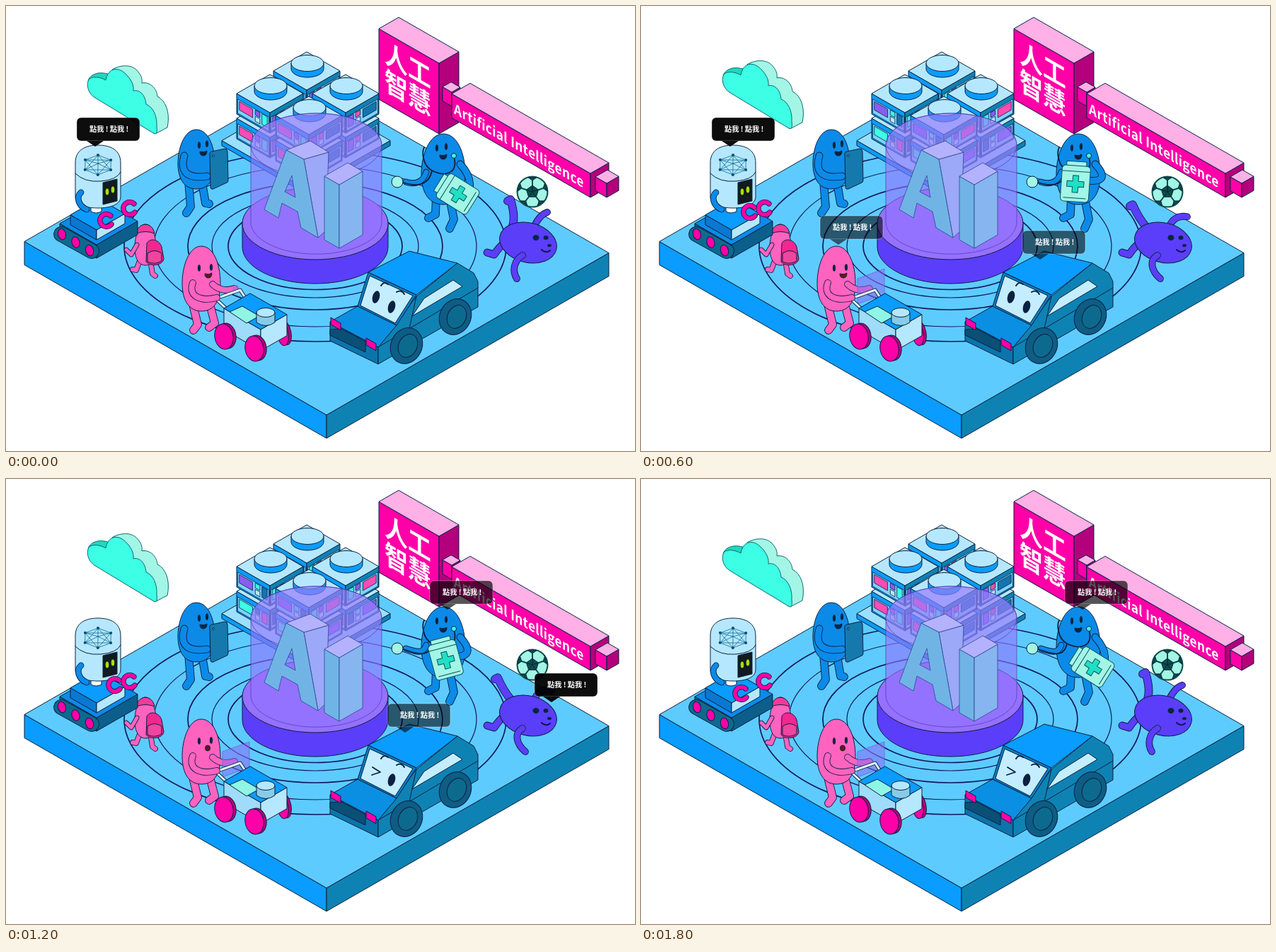
An HTML page that plays this animation: 889 by 630 pixels, repeating every 2100 ms.

```html
<!DOCTYPE html>
<html lang="zh-Hant">
<head>
<meta charset="utf-8">
<title>人工智慧</title>
<style>
html, body { margin: 0; width: 100%; height: 100%; overflow: hidden; background: #fff; }
svg { display: block; width: 100%; height: 100%; stroke: #0b2140; stroke-width: 1; stroke-linejoin: round; }
text { stroke: none; fill: #fff; font-family: "Noto Sans CJK TC", "Noto Sans CJK", "Noto Sans", sans-serif; font-weight: 700; }
</style>
</head>
<body>
<svg id="stage" viewBox="0 0 889 630"></svg>
<script>
const SKY = '#5ecbff', BLUE = '#0a9cff', DEEP = '#0f82b4', PALE = '#b5e8ff', TEAL = '#0d6a8f', BODY = '#0c8ae8',
  HOT = '#ff00a8', ROSE = '#ffb0e6', WINE = '#b4007c', PINK = '#ff63c0', MINT = '#3cffe6',
  FOAM = '#a3f5e6', VIOLET = '#5b3efa', INK = '#0b2140', SLOPE = .575;

// Drawing helpers: each returns SVG markup
const each = (n, draw) => Array.from({ length: n }, (_, i) => draw(i)).join('');
const poly = (pts, fill, more = '') => `<polygon points="${pts}" fill="${fill}" ${more}/>`;
const path = (d, fill = 'none', more = '') => `<path d="${d}" fill="${fill}" ${more}/>`;
const oval = (x, y, rx, ry, fill, turn = 0, more = '') =>
  `<ellipse cx="${x}" cy="${y}" rx="${rx}" ry="${ry}" fill="${fill}" transform="rotate(${turn} ${x} ${y})" ${more}/>`;
const dot = (x, y, rx, ry, fill = '#08263f', turn = 0) => oval(x, y, rx, ry, fill, turn, 'stroke="none"');
const line = (d, color = INK, w = 1.5) =>
  path(d, 'none', `stroke="${color}" stroke-width="${w}" stroke-linecap="round"`);
const limb = (d, color, w = 10) => line(d, INK, w + 1.8) + line(d, color, w);
const iso = (x, y, size, str, more) =>
  `<text transform="matrix(.866 .5 0 1 ${x} ${y})" font-size="${size}" ${more}>${str}</text>`;

// Isometric box: (x, y) is the near corner of its top, w runs to the left, d to the right
function box(x, y, w, d, h, left, top, right) {
  const a = [x - w, y - w * SLOPE], b = [x + d, y - d * SLOPE], back = [x - w + d, y - (w + d) * SLOPE];
  const wall = ([cx, cy], fill) => poly([x, y, cx, cy, cx, cy + h, x, y + h], fill);
  return wall(a, left) + wall(b, right) + poly([[x, y], a, back, b], top);
}

// Upright body, narrow at the top
const egg = (x, y, r, h, fill) => path(`M${x},${y}C${x + r * .65},${y} ${x + r},${y + h * .28} ${x + r},${y + h * .57}` +
  `S${x + r * .65},${y + h} ${x},${y + h} ${x - r},${y + h * .83} ${x - r},${y + h * .57} ${x - r * .65},${y} ${x},${y}Z`, fill);
const smile = (x, y, fill = '#08263f') => path(`M${x - 5},${y - 2}q6,2 10,-1q0,7 -5,7t-5,-6Z`, fill);
const eyes = (x, y, gap, tilt = 0) => dot(x, y, 2.1, 4.8) + dot(x + gap, y + tilt, 2.1, 4.8);

function floor() {
  return box(453, 579, 427, 399, 33, BLUE, SKY, DEEP) + [270, 228, 180, 146, 123].map((r, i) =>
    oval(437, 340, r, r / 2, 'none', 0, `stroke="#101a5c" stroke-width="${i % 2 ? 1.2 : 1.7}"`)).join('');
}

// Server block: both faces carry a panel with one wide and two narrow windows
function block(x, y, tone) {
  const lights = ['#ff4bb4', '#8a5cf0', MINT, '#1474b0'];
  const face = side => {
    const pane = (u, wide, v, high, fill) => {
      const at = s => [x + side * 47 * (1 - s), y + 27 * s + v];
      const [[ax, ay], [bx, by]] = [at(u), at(u + wide)];
      return poly([ax, ay, bx, by, bx, by + high, ax, ay + high], fill, 'stroke-width=".8"');
    };
    const light = i => lights[(tone + i + (side > 0 ? 3 : 0)) % 4];
    return pane(.03, .94, 7, 20, '#7fd2ff') + pane(.08, .4, 9, 12, light(0)) +
      pane(.56, .14, 8, 7, light(1)) + pane(.56, .14, 17, 7, PALE) + pane(.76, .16, 8, 15, light(2));
  };
  return box(x, y + 27, 47, 47, 29, BLUE, PALE, DEEP) + face(-1) + face(1);
}

const stud = (x, y) => path(`M${x - 23},${y - 3}v8a23,12 0 0 0 46,0v-8`, BLUE) + oval(x, y - 3, 23, 11.5, PALE);

function servers(k) {
  const layer = (lift, tone) => [[425, 92], [373, 124], [480, 124], [428, 155]].map(([x, y]) =>
    block(x, y + lift, tone) + (lift ? '' : stud(x + 1, y - 8))).join('');
  return box(424, 259, 119, 119, 7, BLUE, '#9be0ff', DEEP) + layer(35, Math.min(k, 2)) + layer(0, Math.min(k, 1));
}

function hologram() {
  const rim = 'stroke="#4a3bb0" stroke-width=".7"', front = '#70b4e6', side = '#9ca8f8', top = '#b4b2fc';
  return path('M334,308v33a103,52 0 0 0 206,0v-33', VIOLET) + oval(437, 308, 103, 51, '#9670ff') +
    path('M346,197a92,45 0 0 1 185,0V306a92,45 0 0 1 -185,0Z', '#9274ff', `fill-opacity=".62" ${rim}`) +
    oval(438.5, 197, 92.5, 45, '#a894ff', 0, `fill-opacity=".18" ${rim}`) + '<g stroke="#2b4a90" stroke-width=".8">' +
    poly('421,217 456,207 452,318 441,328', side) + poly('396,204 430,191 456,207 421,217', top) +
    path('M365,288L396,204 421,217 441,328 417,314 412,291 390,279 385,300ZM394,263L409,271 404,240Z', front, 'fill-rule="evenodd"') +
    box(471, 253, 21, 33, 90, front, top, '#86b5ef') + '</g>';
}

function sign() {
  const pink = (...size) => box(...size, HOT, ROSE, WINE);
  return pink(612, 81, 85, 28, 100) + iso(535, 79, 38, '人工', 'style="font-weight:900"') +
    iso(535, 118, 38, '智慧', 'style="font-weight:900"') + pink(630, 122, 13, 12, 20) + pink(826, 237, 196, 26, 34) +
    iso(633, 152, 20, 'Artificial Intelligence', 'letter-spacing=".35"') + pink(849, 251, 16, 17, 20);
}

function cloud(k) {
  return `<g transform="translate(0 ${-3.6 * k})" stroke="#0b6a70">` +
    path('M150,90C160,84 175,82 184,90 191,97 193,103 192,109 203,107 213,116 214,128 226,134 231,150 229,166L228,172 211,181Z', FOAM) +
    path('M116,106C118,98 130,91 146,97L141,106Z', '#1fd8bd') +
    path('M126,130C116,124 113,112 117,104 122,99 132,100 141,105 144,88 158,85 169,96 177,104 181,112 180,120 190,118 197,127 198,139 208,143 214,156 213,171 214,178 213,181 210,181Z', MINT) + '</g>';
}

function robot(k) {
  const claw = (x, y) => limb(`M${x + 6},${y - 6}A9,9 0 1 0 ${x + 7},${y + 6}`, HOT, 5.5);
  const reach = 6 * (2 - Math.abs(2 - k)), lift = k % 2 * k;
  const node = i => [130 + 21 * Math.sin(i * 1.05), 225 - 14 * Math.cos(i * 1.05)];
  const web = each(6, i => line(`M${node(i)}L${node(i + 1)}M${node(i)}L${node(i + 2)}M130,223L${node(i)}`, TEAL, .8));
  return box(128, 338, 52, 58, 19, TEAL, BODY, '#0b5f8a') + limb('M78,323L121,347', TEAL, 20) +
    each(3, i => oval(79 + 19.5 * i, 323 + 11.5 * i, 5.5, 8, HOT, -15)) +
    box(128, 317, 37, 40, 14, '#0a78d0', BLUE, PALE) + path('M120,283h15v8q-8,4 -15,0Z', '#fff') +
    path('M98,222C98,204 112,197 130,197S162,204 162,222V270C162,281 148,286 130,286S98,281 98,270Z', PALE) +
    line('M98,237Q111,250 134,248T162,235', INK, 1) + web + each(6, i => dot(...node(i), 2, 2, '#07506f')) +
    poly('137,250 157,245 157,276 137,281', '#111b20') +
    dot(143, 263, 2.3, 4.5, '#a8e000') + dot(151, 260, 2.3, 4.5, '#a8e000') +
    limb('M106,264C99,270 102,283 114,288', BODY, 7) + claw(175 + 3 * lift, 286 - 6 * lift) + claw(142 + reach, 303 - reach);
}

function hiker() {
  return limb('M190,358L184,374 179,373', PINK, 6) + limb('M204,360L207,379 211,382', PINK, 6) +
    egg(197, 309, 15, 58, PINK) + path('M184,322C187,305 207,305 210,322Q197,317 184,322Z', '#f5399b') +
    limb('M185,338L177,352 170,345', PINK, 5) +
    path('M199,336C204,327 217,331 220,341L223,358C222,367 204,370 198,362Z', '#f0288f') +
    path('M200,350q10,-7 20,0v11q-10,6 -20,1Z', '#f0459f');
}

function reader() {
  return limb('M258,248L261,284 255,293', BODY) + limb('M277,250L282,279 287,280', BODY) +
    egg(269, 175, 26, 84, BODY) + eyes(273, 197, 11, -2) + smile(279, 208) +
    path('M288,211Q287,207 291,206L309,202Q313,202 313,206L314,247Q314,250 310,251L293,259Q289,260 289,256Z', '#1579ae') +
    oval(293, 212, 1.4, 1.4, SKY) + limb('M252,212C245,236 258,245 284,241', BODY, 9);
}

function doctor(f) {
  const turn = f % 6 == 0 ? -58 : f < 3 ? 31 * f - 58 : -15;
  const handY = f < 4 ? 249 : 228 + 12 * Math.abs(f - 5);
  const bagX = 615.5 - .39 * turn, bagY = 252 - .24 * turn;
  const bag = `<g transform="translate(${bagX} ${bagY}) rotate(${turn})" stroke="#0b5560">` +
    path('M-14,-25v-6h28v6', FOAM) + '<rect x="-20" y="-25" width="40" height="51" rx="5" fill="#a3f5e6"/>' +
    path('M-20,-17h40M-16,21h32') + path('M-4,-11h8v8h8v8h-8v8h-8v-8h-8v-8h8Z', '#1fe0c4') + '</g>';
  return limb('M608,270L607,295 597,300', BODY) + limb('M627,272L633,302 627,315', BODY) +
    egg(618, 181, 31, 100, BODY) + eyes(609, 201, 13, -2) + smile(618, 213) +
    limb(`M594,235C590,248 580,${handY + 5} 565,${handY}`, BODY, 7) +
    line(`M633,213C640,238 620,242 602,233 588,225 588,206 591,200M602,233C598,254 580,${handY + 8} 559,${handY}`, INK, 1.8) +
    oval(633, 212, 3.5, 3.5, MINT) + oval(553, handY, 8, 8, FOAM) +
    limb(`M642,224C655,238 658,250 ${bagX + 16},${bagY - 4}`, BODY, 9) + bag;
}

function ball() {
  const dark = '#0b5048', at = (r, turn) => {
    const a = (turn - 90) * Math.PI / 180;
    return [744 + r * Math.cos(a), 263 + r * Math.sin(a)];
  };
  return oval(744, 263, 21.5, 21.5, FOAM, 0, `stroke="${dark}" stroke-width="2"`) + each(5, i => {
    const a = i * 72;
    return poly([744, 263, at(9, a), at(9, a + 72)], dark) + line(`M${at(9, a)}L${at(16, a)}`, dark, 2) +
      poly([at(16, a), at(21, a - 16), at(21, a + 16)], dark);
  });
}

function tumbler(k) {
  const x = 710 - 9 * k, y = 274 + 3.6 * k, bend = k > 1 ? 12 : 0;
  return limb(`M715,314Q${x + 11},300 ${x + 3},${y}L${x - 1},${y + 2}`, VIOLET) +
    limb('M707,333Q696,342 690,352L680,349', VIOLET, 9) +
    limb(`M747,311Q755,295 ${765 + 3.5 * k},${292 + 3.2 * k}`, VIOLET, 8) + oval(738, 335, 41, 28, VIOLET, 14) +
    limb(`M730,353C718,360 ${715 + bend / 2},375 ${722 + bend},386`, VIOLET, 8) +
    dot(749, 328, 4.5, 4) + dot(763, 328, 3.5, 3) + dot(768, 339, 3, 2) + line('M757,345q6,6 12,1', '#181058', 2);
}

function vendor(f) {
  const grow = f ? Math.min(1, (f + 1) / 3) : 0, talking = f == 3 || f == 5;
  const [l, t] = [325 - 19 * grow, 379 - 7 * grow], w = 38 * grow, h = 36 * grow;
  const panel = f ? poly([l, t + 14, l + w, t, l + w, t + h, l, t + h + 14], '#8a6cf5', 'fill-opacity=".55" stroke="#6b5cd8" stroke-width=".7"')
    : oval(325, 400, 5, 5, '#a070e0', 0, 'fill-opacity=".6" stroke="none"');
  const sale = talking ? '<text transform="matrix(.9 -.4 0 1 308 414)" font-size="13" fill="#d0ffff" style="font-family:Noto Sans Mono,monospace">Sale!</text>' : '';
  const handle = 'M300,413L331,402 342,419M297,415L325,441';
  return limb('M264,422L271,451 265,459', PINK) + limb('M288,422L295,449 287,455', PINK) + egg(276, 340, 27, 92, PINK) +
    eyes(273, 371, 17, -1) + (f < 3 ? smile(286, 381, '#6b1610') : oval(285, 381, 3.5, talking ? 6 : 4, '#6b1610')) +
    limb('M292,394Q305,406 323,400', PINK, 8) + panel + sale + line(handle, INK, 5) + line(handle, '#dff6ff', 3) +
    limb('M264,392C257,410 274,419 298,413', PINK, 8);
}

function cart() {
  const wheel = (x, y, rx, ry) => oval(x + 4, y - 1, rx, ry, WINE, -10) + oval(x, y, rx, ry, HOT, -10);
  return wheel(391, 464, 8, 17) + box(360, 458, 52, 37, 30, '#9fdcfa', BLUE, PALE) +
    poly('316,433 334,425 358,439 340,449', '#8ff5e4') + path('M354,434v14q13,9 26,0v-14', '#86ccea') +
    oval(367, 434, 13, 6.5, PALE) + wheel(308, 468, 13, 18) + wheel(351, 485, 13, 18);
}

function car(f) {
  const wheel = (x, y) => oval(x, y, 22, 26, '#0d5d85', 25) + oval(x + 2, y, 13, 17, TEAL, 25);
  const lamp = (x, y) => poly([x, y, x + 14, y + 8, x + 14, y + 18, x, y + 10], HOT);
  const look = f == 3 ? -6 : 0, wink = f == 4 || f == 6;
  return poly('458,447 526,483 526,507 458,474', '#0b74ab') + poly('474,457 508,475 508,490 458,466 458,458', '#0a5076') +
    poly('526,483 580,411 638,364 661,378 667,390 667,426 526,507', DEEP) +
    poly('458,447 497,425 552,452 526,483', '#0b8fe2') + poly('512,377 570,347 638,364 580,409', BLUE) +
    poly('512,377 580,409 552,452 497,425', '#0b7cc4') + poly('514,382 575,410 550,449 501,424', '#c4eeff') +
    poly('574,439 591,414 632,388 645,397', '#c4eeff') + line('M526,483L667,399M570,457L580,411', INK, 1) +
    lamp(459, 441) + lamp(509, 470) + wheel(566, 481) + wheel(635, 440) +
    (wink ? line('M518,408l11,7 -12,4', INK, 1.8) : dot(523 + look, 412 + look, 5, 9, INK, 15)) +
    dot(545 + look, 426 + look, 5, 9, INK, 15) + line('M530,396q4,-7 10,-2M552,405q7,-4 11,3', INK, 2);
}

function bubble(x, y, tip, alpha) {
  return `<g stroke="none"><rect x="${x}" y="${y}" width="89" height="33" rx="6" fill-opacity="${alpha}" stroke="#fff" stroke-opacity=".35"/>` +
    path(`M${tip - 12},${y + 33}h24l-12,8Z`, '#000', `fill-opacity="${alpha}"`) +
    `<text x="${x + 18}" y="${y + 20}" font-size="10.2" style="font-weight:900">點我 ! 點我 !</text></g>`;
}

// Speakers take turns: each starts one step after the last and stays for three steps
const speakers = [[100, 158, 126, .95], [253, 297, 279, .57], [539, 318, 564, .57], [747, 275, 771, .95], [599, 144, 624, .67]];

function scene(f) {
  const k = 3 - Math.abs(3 - f);
  return floor() + servers(k) + hologram() + sign() + cloud(k) + hiker() + robot(k) + reader() +
    doctor(f) + ball() + tumbler(k) + vendor(f) + cart() + car(f) +
    speakers.map((s, i) => f >= i && f < i + 3 ? bubble(...s) : '').join('');
}

const stage = document.getElementById('stage');
const start = performance.now();
let shown = -1;
function tick() {
  const f = Math.floor((performance.now() - start) % 2100 / 300);
  if (f !== shown) stage.innerHTML = scene(shown = f);
  requestAnimationFrame(tick);
}
tick();
</script>
</body>
</html>
```
